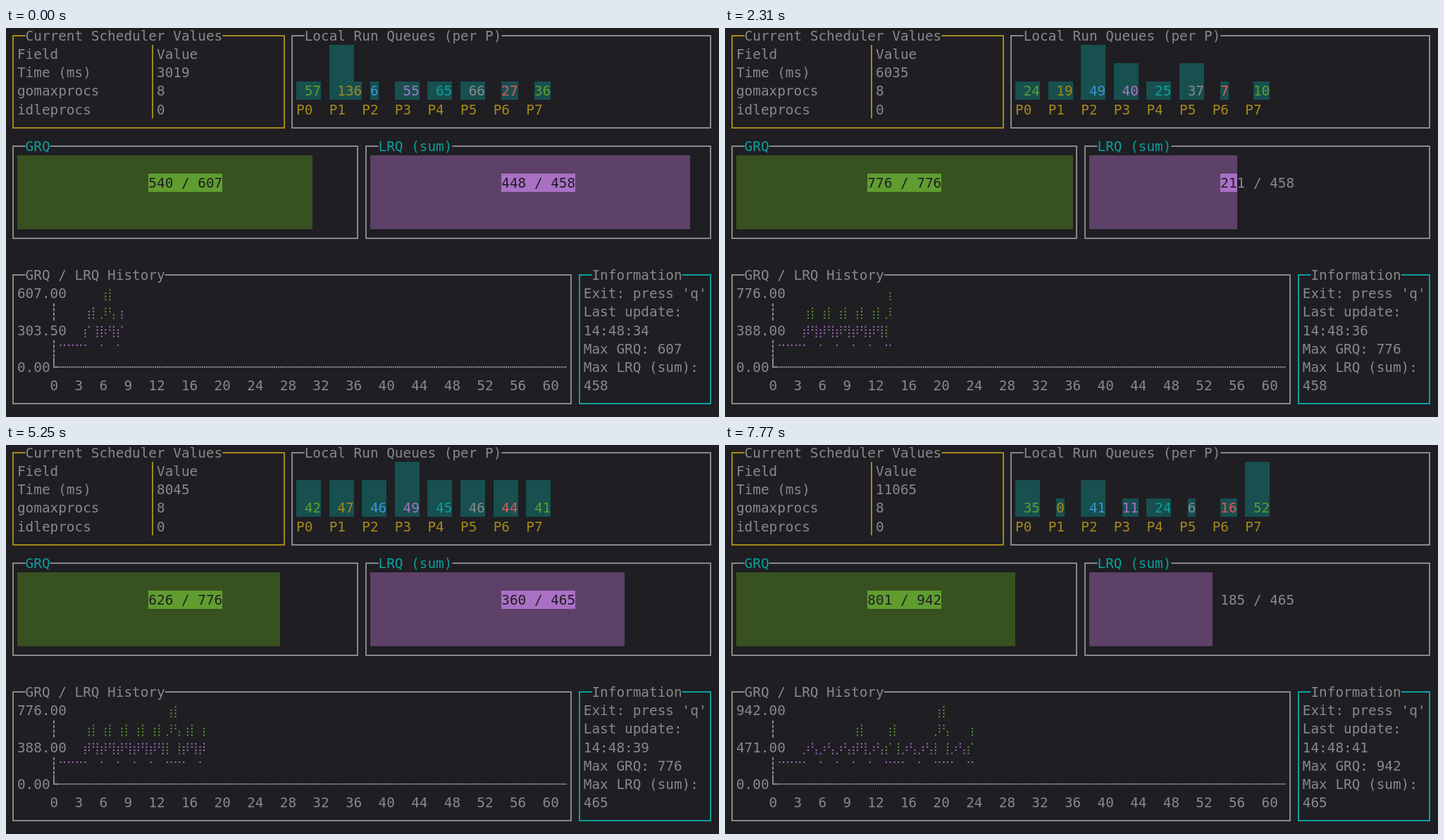
These frames come from a looping animation (1012x553 px, 8000 ms). An HTML page with a canvas:

```html
<!DOCTYPE html>
<html lang="en">
<head>
<meta charset="utf-8">
<title>Scheduler monitor</title>
<style>
  html, body { margin: 0; width: 100%; height: 100%; overflow: hidden; background: #1f1e23; }
  canvas { display: block; width: 1012px; height: 553px; }
</style>
</head>
<body>
<canvas id="screen"></canvas>
<script>
const LOOP = 8000, CELL_W = 11.65, CELL_H = 26.18, LEFT = 4.3, TOP = -2.3;
const C = {
  bg: '#1f1e23', grey: '#88888a', yellow: '#a4881a', cyan: '#0b9f9c', teal: '#17504f',
  green: '#5f9d30', greenDark: '#385120', purple: '#a970c4', purpleDark: '#5d4168',
  blue: '#3c93d2', red: '#e5555a'
};
const barColors = [C.green, C.yellow, C.blue, C.purple, C.cyan, C.grey, C.red, C.green];

// Samples taken before the loop begins: global queue, sum of local queues.
const past = [[530, 458], [607, 381]];
// Screen time, scheduler time, global queue, local queues.
const updates = [
  [0, 3019, 540, [57, 136, 6, 55, 65, 66, 27, 36]],
  [280, 4020, 666, [21, 99, 44, 19, 28, 28, 83, 2]],
  [1330, 5028, 571, [58, 49, 61, 44, 52, 57, 39, 57]],
  [2310, 6035, 776, [24, 19, 49, 40, 25, 37, 7, 10]],
  [3430, 7041, 525, [71, 76, 12, 4, 77, 75, 78, 72]],
  [4480, 8045, 626, [42, 47, 46, 49, 45, 46, 44, 41]],
  [5530, 9052, 942, [6, 3, 7, 4, 5, 8, 2, 9]],
  [6580, 10059, 566, [63, 24, 76, 37, 48, 33, 56, 81]],
  [7630, 11065, 801, [35, 0, 41, 11, 24, 6, 16, 52]]
];
const sum = list => list.reduce((a, b) => a + b, 0);
const samples = past.concat(updates.map(u => [u[2], sum(u[3])]));

const canvas = document.getElementById('screen');
const ctx = canvas.getContext('2d');
const dpr = window.devicePixelRatio || 1;
canvas.width = 1012 * dpr;
canvas.height = 553 * dpr;
ctx.scale(dpr, dpr);

const colX = col => LEFT + col * CELL_W;
const rowY = row => TOP + row * CELL_H;
const midX = col => colX(col + 0.5);
const midY = row => rowY(row + 0.5);

function text(str, col, row, color = C.grey) {
  ctx.fillStyle = color;
  [...String(str)].forEach((ch, i) => ctx.fillText(ch, colX(col + i), midY(row) + 7));
}

function fill(col, row, cols, rows, color) {
  const x = Math.round(colX(col)), y = Math.round(rowY(row));
  ctx.fillStyle = color;
  ctx.fillRect(x, y, Math.round(colX(col + cols)) - x, Math.round(rowY(row + rows)) - y);
}

function stroke(color, points, dash = []) {
  ctx.strokeStyle = color;
  ctx.lineWidth = 2;
  ctx.setLineDash(dash);
  ctx.beginPath();
  points.forEach(([x, y]) => ctx.lineTo(x, y));
  ctx.stroke();
}

function panel(c0, r0, c1, r1, title, border, titleColor) {
  const [x0, y0, x1, y1] = [midX(c0), midY(r0), midX(c1), midY(r1)].map(Math.round);
  stroke(border, [[colX(c0 + 2), y0], [x0, y0], [x0, y1], [x1, y1], [x1, y0],
    [colX(c0 + 2 + title.length), y0]]);
  text(title, c0 + 2, r0, titleColor);
}

function valuesTable(time) {
  panel(0, 0, 33, 5, 'Current Scheduler Values', C.yellow, C.grey);
  [['Field', 'Value'], ['Time (ms)', time], ['gomaxprocs', 8], ['idleprocs', 0]]
    .forEach(([name, value], i) => {
      text(name, 1, i + 1);
      text(value, 18, i + 1);
    });
  stroke(C.yellow, [[208, rowY(1)], [208, rowY(5)]]);
}

function localQueues(queues) {
  panel(34, 0, 85, 5, 'Local Run Queues (per P)', C.grey, C.grey);
  const max = Math.max(...queues);
  queues.forEach((value, i) => {
    const col = 35 + i * 4, height = Math.floor(value / max * 3);
    if (height) fill(col, 4 - height, 3, height, C.teal);
    fill(col + 1, 3, String(value).length, 1, C.teal);
    text(value, col + 1, 3, barColors[i]);
    text('P' + i, col, 4, C.yellow);
  });
}

function gauge(col, title, value, max, dark, bright) {
  panel(col, 6, col + 42, 11, title, C.grey, C.cyan);
  const width = Math.floor(Math.floor(value / max * 100) * 41 / 100);
  fill(col + 1, 7, width, 4, dark);
  const label = `${value} / ${max}`, start = Math.floor((41 - label.length) / 2);
  const covered = Math.max(0, Math.min(label.length, width - start));
  if (covered) fill(col + 1 + start, 8, covered, 1, bright);
  text(label.slice(0, covered), col + 1 + start, 8, C.bg);
  text(label.slice(covered), col + 1 + start + covered, 8);
}

// Rasters one series on a grid of 2 x 4 dots per cell; the last writer colours the cell.
function plotLine(cells, values, max, color) {
  const dotRow = v => (3 - Math.floor(v / max * 3)) * 4;
  const set = (x, y) => {
    const key = (x >> 1) + ',' + (y >> 2);
    const cell = cells[key] || (cells[key] = { dots: new Set() });
    cell.color = color;
    cell.dots.add((x & 1) * 4 + (y & 3));
  };
  let from = dotRow(values[1]);
  values.slice(1).forEach((value, j) => {
    const to = dotRow(value), sign = Math.sign(to - from);
    let y = from;
    for (let i = 0; i < 2; i++) {
      set(j * 2 + i, y);
      const target = from + (to - from) * (i + 1) / 2;
      for (; y !== target; y += sign) set(j * 2 + i, y);
    }
    from = to;
  });
}

function history(shown, max) {
  panel(0, 13, 68, 20, 'GRQ / LRQ History', C.grey, C.grey);
  text(max.toFixed(2), 1, 14);
  text((max / 2).toFixed(2), 1, 16);
  text('0.00', 1, 18);

  const axisX = Math.round(midX(5)), axisY = Math.round(midY(18));
  [15, 17].forEach(row => stroke(C.grey, [[axisX, rowY(row) + 1], [axisX, rowY(row + 1)]], [4.6, 1.95]));
  stroke(C.grey, [[axisX, rowY(18)], [axisX, axisY], [colX(6), axisY]]);
  stroke(C.grey, [[colX(6), axisY], [colX(68), axisY]], [2, CELL_W / 4 - 2]);
  for (let n = 0; n <= 60; n += n < 12 ? 3 : 4) text(n, 5 + n, 19);

  // Every reading is preceded by an empty one.
  const series = k => [0, 0, 0].concat(...shown.map(s => [0, s[k]]));
  const cells = {};
  plotLine(cells, series(0).slice(0), max, C.green);
  plotLine(cells, series(1), max, C.purple);
  for (const key in cells) {
    const [col, row] = key.split(',').map(Number);
    ctx.fillStyle = cells[key].color;
    cells[key].dots.forEach(dot => {
      const x = midX(6 + col) + (dot >> 2 ? 3 : -2.5);
      const y = midY(14 + row) - 4.9 + (dot & 3) * 4.6;
      ctx.fillRect(x - 1, y - 1, 2, 2);
    });
  }
}

function information(second, maxGlobal, maxLocal) {
  panel(69, 13, 85, 20, 'Information', C.cyan, C.grey);
  ["Exit: press 'q'", 'Last update:', '14:48:' + second, 'Max GRQ: ' + maxGlobal,
    'Max LRQ (sum):', maxLocal].forEach((line, i) => text(line, 70, 14 + i));
}

function draw(now) {
  const t = now % LOOP;
  const index = updates.filter(u => u[0] <= t).length - 1;
  const [, time, global, queues] = updates[index];
  const shown = samples.slice(0, past.length + index + 1);
  const maxGlobal = Math.max(...shown.map(s => s[0]));
  const maxLocal = Math.max(...shown.map(s => s[1]));

  ctx.fillStyle = C.bg;
  ctx.fillRect(0, 0, 1012, 553);
  ctx.font = '19.35px "DejaVu Sans Mono", monospace';
  valuesTable(time);
  localQueues(queues);
  gauge(0, 'GRQ', global, maxGlobal, C.greenDark, C.green);
  gauge(43, 'LRQ (sum)', sum(queues), maxLocal, C.purpleDark, C.purple);
  history(shown, maxGlobal);
  information(35 + Math.floor((t - 770) / 1050), maxGlobal, maxLocal);
}

const start = performance.now();
function frame() {
  draw(performance.now() - start);
  requestAnimationFrame(frame);
}
frame();
</script>
</body>
</html>
```
